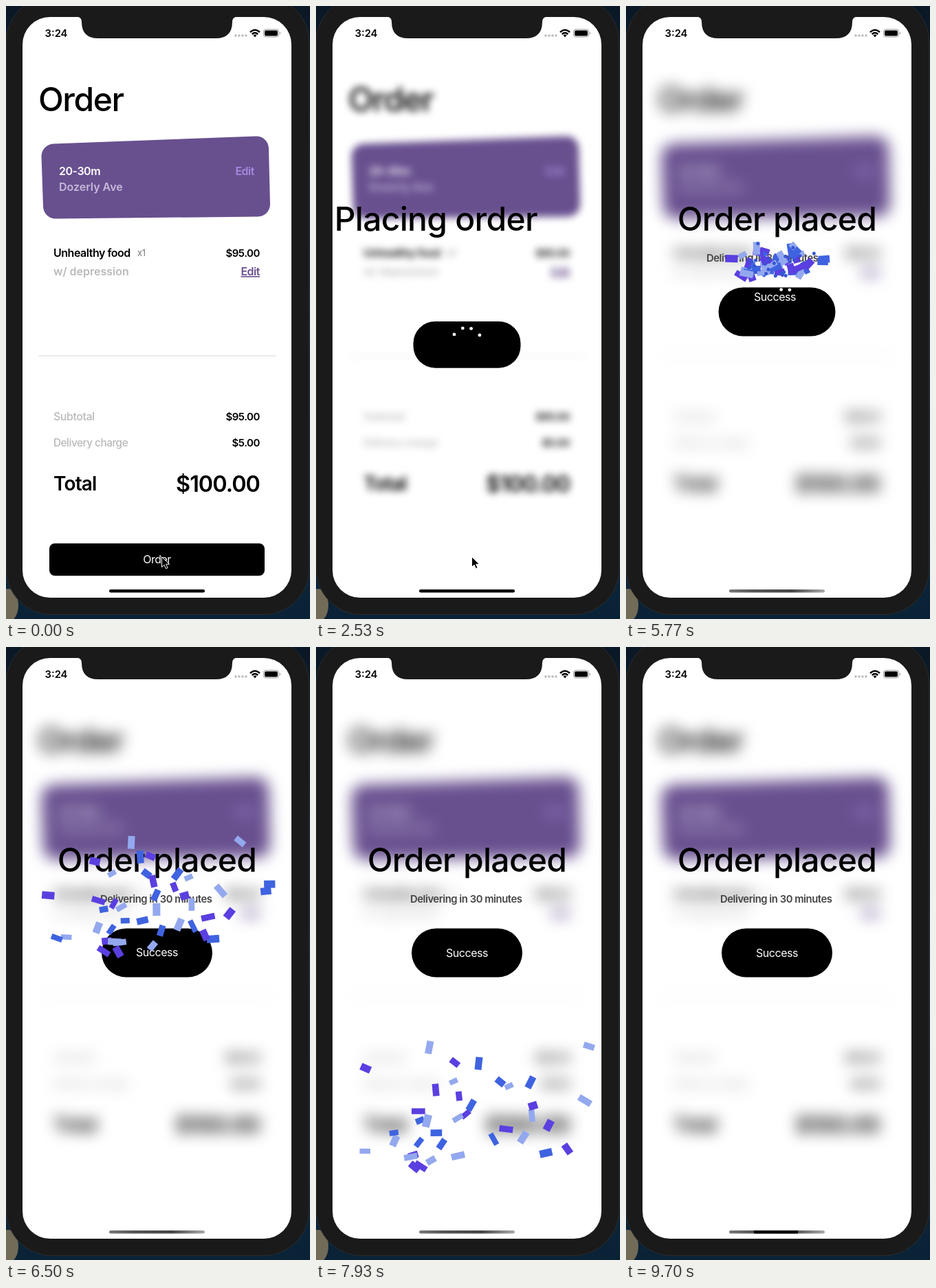
Recreate the animation shown at these times as an HTML page. Size 442x892 px, loop 9730 ms.

```html
<!DOCTYPE html>
<html lang="en">
<head>
<meta charset="utf-8">
<title>Order</title>
<style>
html, body { margin: 0; width: 100%; height: 100%; overflow: hidden; background: #0b2238; }
svg { display: block; width: 442px; height: 892px; }
text { font: 500 16px Inter, "Open Sans", sans-serif; letter-spacing: -.03em; }
.bold { font-weight: 600; }
.wide { font-weight: 600; letter-spacing: 0; }
.end { text-anchor: end; }
.mid { text-anchor: middle; }
.grey { fill: #b9b9b9; }
.price { font-size: 15px; font-weight: 600; text-anchor: end; }
.head { font-size: 48px; }
.mid.head { letter-spacing: -.015em; }
.note { font-size: 14.8px; font-weight: 600; fill: #444; }
.label { font-weight: 400; fill: #fff; text-anchor: middle; }
</style>
</head>
<body>
<svg viewBox="0 0 442 892">
  <defs>
    <linearGradient id="sea" x2="0" y2="1">
      <stop stop-color="#0a1826"/><stop offset=".5" stop-color="#17304a"/><stop offset="1" stop-color="#0a2236"/>
    </linearGradient>
    <linearGradient id="barGrey">
      <stop stop-color="#777"/><stop offset=".25" stop-color="#555"/>
      <stop offset=".65" stop-color="#444"/><stop offset="1" stop-color="#aaa"/>
    </linearGradient>
    <clipPath id="screen"><rect x="24" y="16" width="391" height="845" rx="40"/></clipPath>
    <clipPath id="pillClip"><rect class="pill"/></clipPath>
  </defs>

  <rect width="442" height="892" fill="url(#sea)"/>
  <ellipse cx="3" cy="872" rx="15" ry="24" fill="#716b58"/>
  <rect x=".5" y="-14" width="440" height="899.5" rx="66" fill="#1a1a1a" stroke="#2c2c2c"/>

  <g clip-path="url(#screen)">
    <rect x="24" y="16" width="391" height="845" fill="#fff"/>
    <g id="page">
      <text class="head" x="47" y="153">Order</text>
      <path d="M69.5 218.5 364 207.5 366 288.5 72 291.5Z" fill="#68508f" stroke="#68508f" stroke-width="36" stroke-linejoin="round"/>
      <text class="bold" x="77" y="246" fill="#fff">20-30m</text>
      <text class="wide" x="77" y="269" fill="#c6bad9">Dozerly Ave</text>
      <text class="bold end" x="361" y="246" fill="#a48be0">Edit</text>
      <text class="bold" x="69" y="365">Unhealthy food</text>
      <text x="191" y="364" fill="#777" style="font-size:13px;font-weight:400">x1</text>
      <text class="price" x="369" y="365">$95.00</text>
      <text class="grey wide" x="69" y="392">w/ depression</text>
      <text class="bold end" x="369" y="392" fill="#68508f" text-decoration="underline">Edit</text>
      <path d="M47 509H392" stroke="#e4e4e4" stroke-width="1.5"/>
      <text class="grey" x="69" y="603">Subtotal</text>
      <text class="price" x="369" y="603">$95.00</text>
      <text class="grey" x="69" y="641" style="font-size:15.3px">Delivery charge</text>
      <text class="price" x="369" y="641">$5.00</text>
      <text class="bold" x="69" y="705" style="font-size:28px">Total</text>
      <text class="bold end" x="369" y="707" style="font-size:32.4px">$100.00</text>
    </g>

    <text id="title" class="head mid" y="327"></text>
    <text id="note" class="note" y="372"></text>

    <rect class="pill"/>
    <g clip-path="url(#pillClip)">
      <text id="orderLabel" class="label" x="219.5"></text>
      <g id="dots" fill="#fff"></g>
      <text id="doneLabel" class="label" x="219.5"></text>
    </g>

    <g id="confetti"></g>
    <rect id="bar" x="150" y="849" width="139" height="4.5" rx="2.2"/>
    <rect id="barCore" x="186" y="849" width="64" height="4.5"/>
  </g>

  <path d="M102 15Q110 16 110 23Q110 47 134 47H305Q329 47 329 23Q329 16 337 15Z" fill="#1a1a1a"/>
  <text class="wide" x="56.5" y="45" style="font-size:14.8px">3:24</text>
  <path d="M334 43H350" stroke="#bbb" stroke-width="3.6" stroke-linecap="round" stroke-dasharray="0 5"/>
  <path d="M355 38Q362 31.5 369 38M357.7 41Q362 37 366.3 41" fill="none" stroke="#000" stroke-width="2.4"/>
  <path d="M359.5 42.5Q362 40.5 364.5 42.5L362 45.5Z"/>
  <rect x="374.5" y="34" width="22" height="11" rx="3" fill="none" stroke="#999"/>
  <rect x="376" y="35.5" width="19" height="8" rx="1.8"/>
  <path d="M398 37.5Q400 39.5 398 41.5Z" fill="#888"/>
  <path id="cursor" d="M0 0V15L3.5 11.8 6 17.2 8.6 16 6.2 10.8H11Z" stroke="#fff" stroke-linejoin="round"/>
</svg>

<script>
const LOOP = 9730, PLACE = 2280, DONE = 5585, BURST = 5680;
const $ = id => document.getElementById(id);
const clamp = v => Math.min(1, Math.max(0, v));
const lerp = (a, b, p) => a + (b - a) * p;
const ramp = (t, from, length) => clamp((t - from) / length);
const set = (el, attrs) => { for (const k in attrs) el.setAttribute(k, attrs[k]); };
const show = (el, on) => { el.style.display = on ? '' : 'none'; };

function add(parent, tag, attrs) {
  const el = document.createElementNS('http://www.w3.org/2000/svg', tag);
  set(el, attrs);
  return parent.appendChild(el);
}

// Damped spring: 0.55 s response, 0.825 damping ratio
function spring(ms) {
  if (ms <= 0) return 0;
  const s = ms / 1000, a = 6.45 * s;
  return 1 - Math.exp(-9.42 * s) * (Math.cos(a) + 1.46 * Math.sin(a));
}

let seed = 11;
function rand(min, max) {
  seed = (seed * 16807) % 2147483647;
  return min + (max - min) * seed / 2147483647;
}

const dots = [0, 1, 2, 3].map(i => add($('dots'), 'circle', { cx: 201 + 12.3 * i, r: 2.4 }));
const pills = document.querySelectorAll('.pill');
const colors = ['#93a8ee', '#5b3fe0', '#3f63e0'];

const pieces = Array.from({ length: 66 }, (_, i) => {
  const round = i >= 42;
  const w = rand(7.5, 11), h = rand(12, 20);
  const el = round
    ? add($('confetti'), 'circle', { r: 2.5, fill: '#3457d2' })
    : add($('confetti'), 'rect', { x: -w / 2, y: -h / 2, width: w, height: h, fill: colors[i % 3] });
  return {
    el, round,
    x: rand(178, 266), y: rand(408, 416),
    // Golden-ratio steps spread the pieces evenly to both sides
    pushX: lerp(-125, 110, (i * 0.618) % 1), pushY: rand(-275, -88),
    drift: rand(-45, 55), angle: rand(0, 180), spin: rand(-15, 15)
  };
});

function drawConfetti(t) {
  const s = (t - BURST) / 1000;
  show($('confetti'), s >= 0);
  if (s < 0) return;
  const slow = 1 - Math.exp(-3 * s);
  const fall = 229 * (s - slow / 3);
  for (const p of pieces) {
    const x = p.x + p.pushX * slow + p.drift * s;
    const y = p.y + p.pushY * slow + fall;
    const size = p.round ? 1 - ramp(s, 0.2, 0.4) : 1;
    set(p.el, { transform: `translate(${x} ${y}) rotate(${p.angle + p.spin * s}) scale(${size})` });
  }
}

function drawPill(t, open, done) {
  const top = lerp(782, 409.5, open), height = lerp(47, 71, open);
  const width = lerp(313, 132, open) + 29 * done + 84 * done * (1 - done);
  const center = top + height / 2;
  for (const pill of pills)
    set(pill, { x: 219.5 - width / 2, y: top, width, height, rx: lerp(8, 35.5, clamp(open)) });

  $('orderLabel').textContent = open < 1 ? 'Order' : '';
  set($('orderLabel'), { y: center + 5.5 - 71 * open });
  $('doneLabel').textContent = done > 0 ? 'Success' : '';
  set($('doneLabel'), { x: 219.5 - 10 * (1 - done), y: center + 5.5 - 71 * (1 - done) });

  show($('dots'), open > 0 && done < 0.95);
  const phase = 93 - 0.2978 * (t - 2530);
  const shift = -129 * (1 - open) - 63 * done;
  dots.forEach((dot, i) => set(dot, {
    cy: center + 2.7 + 10.8 * Math.cos((phase + 60 * i) * Math.PI / 180) + shift
  }));
}

function draw(t) {
  const open = spring(t - PLACE), done = spring(t - DONE);
  const placed = t >= DONE;

  const blur = 10.5 * ramp(t, PLACE, 500);
  $('page').style.filter = blur ? `blur(${blur}px)` : 'none';

  $('title').textContent = placed ? 'Order placed' : 'Placing order';
  set($('title'), { x: 219.5 - 341 * (1 - open) });
  show($('title'), open > 0);

  const settled = ramp(t, 5780, 180);
  $('note').textContent = placed ? 'Delivering in 30 minutes' : 'This might take few minutes...';
  set($('note'), { x: placed ? lerp(117, 137, settled) : 117, opacity: ramp(t, 2900, 300) });

  drawPill(t, open, done);
  drawConfetti(t);

  set($('bar'), { fill: placed ? 'url(#barGrey)' : '#000' });
  show($('barCore'), t >= 9500);

  const move = ramp(t, 3400, 300);
  set($('cursor'), { transform: `translate(${lerp(226.5, 228.5, move)} ${lerp(801.5, 794.5, move)})` });
  show($('cursor'), t < 5000);
}

const start = performance.now();
function tick() {
  draw((performance.now() - start) % LOOP);
  requestAnimationFrame(tick);
}
tick();
</script>
</body>
</html>
```
